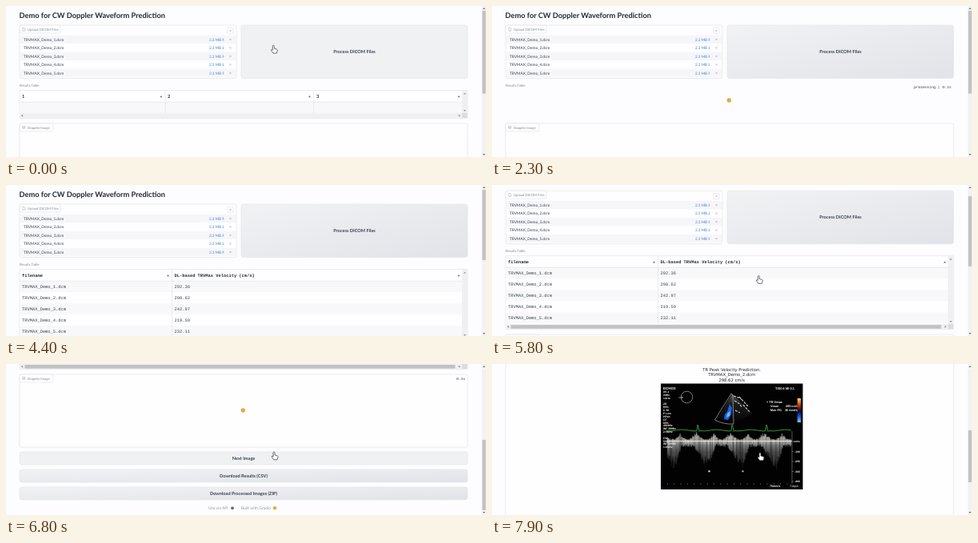
Recreate the animation shown at these times as an HTML page. Size 600 by 189 pixels, loop 8000 ms.

```html
<!DOCTYPE html>
<html lang="en">
<head>
<meta charset="utf-8">
<title>Doppler waveform demo</title>
<style>
html, body { margin: 0; width: 100%; height: 100%; overflow: hidden; background: #fdfcfe; }
svg { display: block; font-family: Lato, "Open Sans", sans-serif; text-rendering: geometricPrecision; }
.mono { font-family: "Liberation Mono", "DejaVu Sans Mono", monospace; }
.plot { font-family: "DejaVu Sans", sans-serif; }
.scan { font-family: "Liberation Sans", sans-serif; }
</style>
</head>
<body>
<svg id="stage" width="600" height="189" viewBox="0 0 600 189"></svg>
<script>
const LINE = '#e2e4e9', INK = '#374151', GRAY = '#858b98', LOGO = '#dcae45';
const LOOP = 8000, RUN = 2200, RESULTS = 4100, NEXT = 6700, IMAGE = 7400;

const rect = (x, y, w, h, fill, extra = '') =>
  `<rect x="${x}" y="${y}" width="${w}" height="${h}" fill="${fill}" ${extra}/>`;
const box = (x, y, w, h, r = 2, id = '') =>
  rect(x, y, w, h, '#fefdff', `rx="${r}" stroke="${LINE}" stroke-width=".7" ${id}`);
const text = (x, y, size, s, fill = INK, extra = '') =>
  `<text x="${x}" y="${y}" font-size="${size}" fill="${fill}" ${extra}>${s}</text>`;
const path = (d, stroke, width = .6, extra = 'fill="none"') =>
  `<path d="${d}" stroke="${stroke}" stroke-width="${width}" ${extra}/>`;
const dot = (x, y, r, fill) => `<circle cx="${x}" cy="${y}" r="${r}" fill="${fill}"/>`;
const group = (id, body) => `<g id="${id}">${body}</g>`;
const arrow = (x, y, turn = 0, fill = '#777') =>
  `<path d="M-1.6 1.1L0 -1.1L1.6 1.1Z" fill="${fill}" transform="translate(${x} ${y}) rotate(${turn})"/>`;
const cross = (x, y) => path(`M${x - 1} ${y - 1}l2 2m0 -2l-2 2`, '#8b919d', .5);
const MID = 'text-anchor="middle"', END = 'text-anchor="end"', BOLD = 'font-weight="700"';

const button = (id, y, h, label, x = 17, w = 560) =>
  rect(x, y, w, h, 'url(#idle)', `id="${id}" rx="3" stroke="${LINE}" stroke-width=".6"`) +
  text(x + w / 2, y + h / 2 + 2, 5.6, label, INK, `${MID} ${BOLD}`);

const files = [1, 2, 3, 4, 5].map(n => `TRVMAX_Demo_${n}.dcm`);
const speeds = ['292.36', '298.62', '242.97', '219.59', '232.11'];

function upload() {
  let out = text(16.5, 15, 9.25, 'Demo for CW Doppler Waveform Prediction', '#1f2937', BOLD) +
    box(17, 24, 271, 66.5) + box(17, 24, 51, 10) +
    path('M21 27.2h1.8l1 1v3h-2.8z', GRAY, .4) + text(27, 30.7, 4.25, 'Upload DICOM Files', GRAY) +
    box(277, 27.3, 7, 7.4, 1) + cross(280.5, 31);
  files.forEach((name, i) => {
    const y = 43.5 + i * 10.5;
    if (i % 2 == 0) out += rect(18, y - 6.8, 269, 10.4, '#f6f6f9');
    out += text(22, y, 4.85, name) + text(254, y, 4.7, '2.3 MB', '#3b82d6') +
      path(`M271.4 ${y - 3.4}v3.2m-.9 -.9l.9 .9l.9 -.9`, '#3b82d6', .5) + cross(280.5, y - 1.6);
  });
  return out + button('process', 24, 66.5, 'Process DICOM Files', 294, 283) +
    text(17, 101, 4.35, 'Results Table', GRAY);
}

// Frame, column dividers and scrollbars shared by both tables
function table(bottom, columns, body) {
  const bar = bottom - 6.5;
  return box(17, 105.5, 560, bottom - 105.5, 1) + body +
    path(columns.map(x => `M${x} 105.5V${bar}`).join('') + 'M17 120.2H570', LINE, .7) +
    [...columns, 571].map(x => arrow(x - 5, 113.2)).join('') +
    rect(570, 106, 6.7, bottom - 106.3, '#f0f0f2') + rect(17.3, bar, 559, 6.2, '#f0f0f2') +
    rect(570, bar, 6.7, 6.2, '#dcdcde') +
    arrow(573.5, 109.5, 0, '#999') + arrow(573.5, bar - 3, 180, '#999') +
    arrow(20, bar + 3.2, -90, '#999') + arrow(567, bar + 3.2, 90, '#999');
}

const emptyTable = () => table(140.5, [199, 384.5],
  rect(17.4, 120.2, 553, 14, '#f8f8fa') +
  [20, 202, 388].map((x, i) => text(x, 115, 5.6, i + 1, '#1f2937', BOLD)).join(''));

function results() {
  let body = text(20, 115, 5.4, 'filename', '#1f2937', BOLD) +
    text(210.5, 115, 5.4, 'DL-based TRVMax Velocity (cm/s)', '#1f2937', BOLD);
  files.forEach((name, i) => {
    const y = 129 + i * 14;
    body += rect(17.4, y - 8.8, 553, 14, i % 2 ? '#fefdff' : '#f8f8fa') +
      text(20, y, 5.4, name) + text(210.5, y, 5.4, speeds[i]);
  });
  return `<g class="mono">${table(197.5, [207.5], body)}</g>` + rect(23.5, 192, 538, 4.6, '#c1c1c3');
}

// Grainy velocity jets below the baseline and short bright bursts above it
function spectrum() {
  let seed = 7;
  const rnd = () => (seed = seed * 16807 % 2147483647) / 2147483647;
  const down = ['', '', ''], up = ['', '', ''];
  for (let x = 219; x < 374; x += .4) {
    const d = (x - 271 + 3 * 42.5 - 18 + .5) % 42.5 - 24.5;
    const shade = Math.floor(rnd() * 3);
    const jet = Math.max(0, d < 0 ? 1 + d / 19 : 1 - d / 9);
    const depth = 3 + 4 * rnd() + 31 * jet * (.5 + .5 * rnd());
    const burst = Math.max(0, 1 - Math.abs(d + 15) / 9, .8 - Math.abs(d - 7) / 8);
    const rise = 1.5 + 2 * rnd() + 9 * burst * (.5 + .5 * rnd());
    down[shade] += `M${x.toFixed(1)} 97v${depth.toFixed(1)}`;
    up[shade] += `M${x.toFixed(1)} 97v${(-rise).toFixed(1)}`;
  }
  return down.map((d, i) => path(d, 'url(#fall)', .5, `opacity="${.4 + i * .3}"`) +
    path(up[i], '#fff', .5, `opacity="${.4 + i * .25}"`)).join('');
}

function scan() {
  const white = (x, y, size, s, extra = '') => text(x, y, size, s, '#fff', extra);
  let ecg = 'M218 84';
  for (let x = 219; x <= 374; x++) {
    const d = (x - 257 + 86) % 43;
    const y = d == 0 ? 76 : d == 1 ? 78 : d == 2 ? 84.5 : 83 + Math.sin(d / 5) * .8;
    ecg += `L${x} ${y.toFixed(1)}`;
  }
  const left = ['X5-1', '20Hz', '14cm', '', '2D', '65%', 'C 50', 'P Low', 'HPen', 'CF', '65%',
    '4000Hz', 'WF 399Hz', '2.5MHz', '', 'CW', '50%', 'WF 225Hz', '1.8MHz'];
  return rect(211, 24.5, 177.5, 132.5, '#020203') +
    white(214, 31.5, 4.5, 'ECHO3', BOLD) +
    left.map((s, i) => white(214, 36 + i * 3.85, 3.4, s, BOLD)).join('') +
    white(354, 31.5, 4, 'TIS0.6  MI 0.1', BOLD) + white(343, 49, 3.9, '+ TR Vmax', BOLD) +
    white(348, 54, 3.8, 'Vmax', BOLD) + white(383, 54, 3.8, '299 cm/s', `${END} ${BOLD}`) +
    white(348, 59, 3.8, 'Max PG', BOLD) + white(383, 59, 3.8, '36 mmHg', `${END} ${BOLD}`) +
    `<circle cx="243.5" cy="41.5" r="7.3" fill="none" stroke="#ccc" stroke-width=".6"/>` +
    path('M233 42h6m-1.5 -1.2v2.4', '#ccc', .6) +
    path('M300 37L283 67Q302 78 326 62Z', 'none', 0, 'fill="url(#fan)"') +
    path('M302 40q8 2 12 6M303 46q7 3 9 8M309 41l11 12M314 51l8 9M304 58l6 3', '#c4c4c4', 1.2,
      'fill="none" stroke-dasharray="3 1.4"') +
    path('M299 37L278.5 70Q290 76 302 75L301 39Z', '#ccc', .6) +
    path('M297 50l3 5l-1 8l-4 7l-5 -1l1 -6l3 -3z', 'none', 0, 'fill="#205ee6"') +
    path('M294 62l4 -3l-1 6l-4 2z', 'none', 0, 'fill="#5fc6ef"') +
    rect(381.7, 43, 4.3, 15, 'url(#warm)') + rect(381.7, 58, 4.3, 15, 'url(#cool)') +
    spectrum() + path('M218 96.5H375', '#f3ddd4', 1) + path(ecg, '#43b83c', .8) +
    path('M375 84V150M375 97h2M375 109.5h2M375 122h2M375 134.5h2M375 147h2', '#aaa', .5) +
    ['cm/s', '-100', '-200', '-300', '-400'].map((s, i) =>
      white(385, 98 + i * 12.5, 3.4, s, `${END} ${BOLD}`)).join('') +
    path('M219 150H374', '#c98080', 1, 'stroke-dasharray=".9 7.4"') +
    dot(271.5, 134.3, 1.3, '#bbb') + dot(313.5, 134.3, 1.2, '#999') +
    white(347, 154, 3.6, '75mm/s', BOLD) + white(372, 154, 3.6, '71bpm');
}

const figure = () => `<g transform="translate(0 167)"><g class="plot" ${MID}>` +
  text(299.7, 8.5, 5.25, 'TR Peak Velocity Prediction.', '#222') +
  text(299.7, 15, 5.25, 'TRVMAX_Demo_2.dcm', '#222') +
  text(299.7, 21.5, 5.25, '298.62 cm/s', '#222') + `</g><g class="scan">${scan()}</g></g>`;

const timer = (id, y) => text(574, y, 4.6, '', '#333', `id="${id}" class="mono" ${END}`);

const stage = document.getElementById('stage');
const gradient = (id, dir, ...stops) => `<linearGradient id="${id}" ${dir}>` +
  stops.map(([o, c, a = 1]) => `<stop offset="${o}" stop-color="${c}" stop-opacity="${a}"/>`).join('') +
  '</linearGradient>';
const DOWN = 'x1="0" y1="0" x2="0" y2="1"';

stage.innerHTML = '<defs>' +
  gradient('idle', 'x1="0" y1="0" x2="1" y2="1"', [0, '#f1f2f4'], [1, '#e1e3e8']) +
  gradient('fall', 'gradientUnits="userSpaceOnUse" x1="0" y1="97" x2="0" y2="136"',
    [0, '#fff'], [.12, '#ccc', .8], [.35, '#999', .6], [1, '#777', .25]) +
  gradient('fan', DOWN, [0, '#555'], [.4, '#1c1c1c'], [1, '#060606']) +
  gradient('warm', DOWN, [0, '#f5dc4a'], [.5, '#d9471c'], [1, '#300']) +
  gradient('cool', DOWN, [0, '#003'], [.5, '#1d50d8'], [1, '#72d2f4']) + '</defs>' +
  group('page', upload() + group('empty', emptyTable()) +
    group('loading', timer('runTime', 102.5) + dot(296.3, 118, 2.7, LOGO)) +
    group('results', results()) +
    group('lower', box(17, 147, 560, 91, 2, 'id="card"') + group('figure', figure()) +
      box(17, 147, 42, 10) + path('M20.8 150.3h2.8v2.8h-2.8zM21 152.8l1 -1l1.4 1.1', GRAY, .4) +
      text(27, 153.5, 4.3, 'Doppler Image', GRAY) +
      group('waiting', timer('nextTime', 153.5) + dot(296.3, 192, 2.7, LOGO)) +
      group('footer', button('next', 244, 16, 'Next Image') +
        button('csv', 266, 16, 'Download Results (CSV)') +
        button('zip', 288, 16, 'Download Processed Images (ZIP)') +
        text(253, 316, 5, 'Use via API', '#9299a5') + dot(283, 314.3, 1.9, '#6b6570') +
        text(289.5, 316, 5, '·', '#9299a5') +
        text(294, 316, 5, 'Built with Gradio', '#9299a5') + dot(336, 314.3, 2.2, LOGO)))) +
  rect(594.8, 0, 5.2, 189, '#f2f2f3') + arrow(597.5, 3) + arrow(597.5, 186, 180) +
  rect(595.4, 6, 4.2, 100, '#c1c1c3', 'id="thumb"') +
  group('hand', path('M-1 1Q-1 0 0 0Q1 0 1 1V4L4.2 4.9Q5.2 5.3 5 6.5L4 9.8H-.3L-2.9 6.2' +
    'Q-3 5 -1.9 5.2L-1 6Z', '#333', .7, 'fill="#fff"'));

const $ = id => document.getElementById(id);
const show = (id, on) => $(id).style.display = on ? '' : 'none';
const move = (id, x, y) => $(id).setAttribute('transform', `translate(${x} ${y})`);
const hover = (id, on) => $(id).setAttribute('fill', on ? '#f0f1f3' : 'url(#idle)');

// Piecewise linear value through [time, value] points
function along(t, points) {
  let [t0, v0] = points[0];
  for (const [t1, v1] of points) {
    if (t < t1) return t1 == t0 ? v0 : v0 + (v1 - v0) * Math.max(0, t - t0) / (t1 - t0);
    [t0, v0] = [t1, v1];
  }
  return v0;
}

function draw(now) {
  const t = now % LOOP;
  const running = t >= RUN && t < RESULTS, done = t >= RESULTS;
  const waiting = t >= NEXT && t < IMAGE, pictured = t >= IMAGE;
  const seconds = start => (Math.floor((t - start) / 100 + .01) / 10).toFixed(1) + 's';

  show('empty', t < RUN);
  show('loading', running);
  show('results', done);
  show('waiting', waiting);
  show('figure', pictured);
  $('runTime').textContent = 'processing | ' + seconds(RUN);
  $('nextTime').textContent = seconds(NEXT);
  hover('process', t < RUN);
  hover('next', t >= 6300 && !pictured);

  const grow = pictured ? 135 : 0, height = 323 + (done ? 57 : 0) + grow;
  move('lower', 0, done ? 57 : 0);
  move('footer', 0, grow);
  $('card').setAttribute('height', 91 + grow);

  const scroll = along(t, [[5700, 0], [5800, 16.5], [6300, 191], [7500, 191], [7800, 224]]);
  move('page', 0, -scroll);
  $('thumb').setAttribute('y', 6 + scroll * 177 / height);
  $('thumb').setAttribute('height', 189 * 177 / height);

  show('hand', t < RUN || t >= 5500);
  if (t < RUN) move('hand', 334.3, 49.3);
  else move('hand', along(t, [[5800, 333.3], [6300, 335]]),
    along(t, [[5800, 113.6], [6300, 110], [7500, 110], [7800, 111]]));
  requestAnimationFrame(draw);
}
requestAnimationFrame(draw);
</script>
</body>
</html>
```
